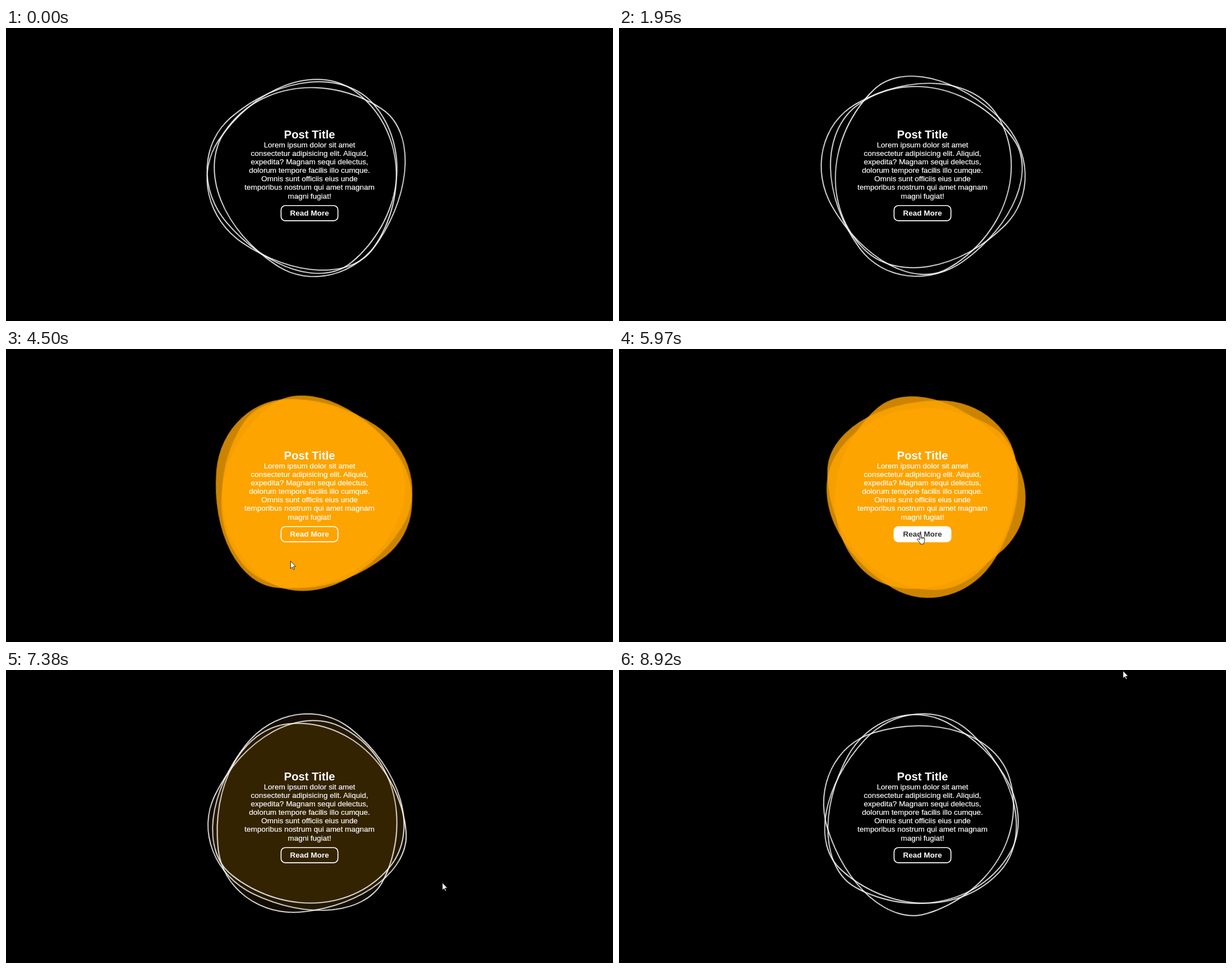
Write an HTML page that moves like this. It is 1076 px wide and 520 px high and loops after 8.96 s.

```html
<!DOCTYPE html>
<html lang="en">
<head>
<meta charset="utf-8">
<title>Blob card</title>
<style>
  * { margin: 0; padding: 0; box-sizing: border-box; }
  html, body { width: 100%; height: 100%; overflow: hidden; background: #000; }
  body { position: relative; }

  /* Laid out for a 1280px wide page, shown at 1076px */
  .page {
    position: absolute; left: 0; top: 0;
    width: 1280px; height: 618.6px;
    transform: scale(.840625); transform-origin: 0 0;
    font: 16px/18px "Liberation Sans", Arial, sans-serif;
    color: #fff; text-align: center; white-space: nowrap;
  }
  .blob {
    position: absolute; left: 440px; top: 109.3px;
    width: 400px; height: 400px;
    border: 2px solid #fff;
    border-radius: 38% 62% 63% 37% / 41% 44% 56% 59%;
  }
  .card { position: absolute; left: 0; top: 210.8px; width: 100%; }
  h2 { font-size: 24px; line-height: 27px; }
  p { -webkit-text-stroke: .25px; }
  .more {
    display: inline-block; margin-top: 10px; padding: 6px 18px;
    border: 2px solid #fff; border-radius: 10px;
    font-weight: bold;
  }
  .cursor { position: absolute; left: 0; top: 0; }
  .cursor svg { position: absolute; overflow: visible; fill: #fff; stroke: #000; }
  #hand { left: -5px; }
</style>
</head>
<body>
<div class="page">
  <div class="blob"></div>
  <div class="blob"></div>
  <div class="blob"></div>
  <div class="card">
    <h2>Post Title</h2>
    <p>Lorem ipsum dolor sit amet<br>
      consectetur adipisicing elit. Aliquid,<br>
      expedita? Magnam sequi delectus,<br>
      dolorum tempore facilis illo cumque.<br>
      Omnis sunt officiis eius unde<br>
      temporibus nostrum qui amet magnam<br>
      magni fugiat!</p>
    <div class="more">Read More</div>
  </div>
</div>
<div class="cursor">
  <svg id="arrow" width="10" height="16" viewBox="0 0 12 19">
    <path d="M.5 .5V16.5L4.3 13 6.8 18.5 9 17.5 6.5 12H11.5Z"/>
  </svg>
  <svg id="hand" width="14.3" height="18.5" viewBox="0 0 17 22">
    <path d="M5.5 13V2q0-1.5 1.5-1.5T8.5 2V8q0-1.2 1.4-1.2T11.3 8.3q0-1 1.3-1t1.3 1.4q0-.9 1.2-.9t1.3 1.4V14q0 2-1 3.5T14.5 21.5H7.5Q7 19 5 17L1 12.5Q.3 11 1.5 10.5T4 11.5Z"/>
    <path d="M8.5 8v3M11.3 8.3V11M13.9 8.7V11" fill="none"/>
  </svg>
</div>
<script>
const LOOP = 8960;
const AGE = 51.55;            // seconds the blobs have been turning at loop start
const IN = 3425, OUT = 7060;  // pointer enters and leaves the circle
const LAG = 50;               // the fill starts to fade in shortly after
const PRESS = [5000, 6840];   // pointer enters and leaves the button
const $ = s => document.querySelector(s);

// steps: [ms, properties, easing to the next step]
function track(el, steps) {
  const frames = steps.map(([ms, props, easing = 'linear']) =>
    ({ ...props, easing, offset: ms / LOOP }));
  const last = frames[frames.length - 1];
  if (last.offset < 1) frames.push({ ...last, offset: 1 });
  el.animate(frames, { duration: LOOP, iterations: Infinity });
}

// from a to b between on and off, with eased fades; hard changes if fade is 0
function hover(el, a, b, on, off, fade) {
  track(el, [
    [0, a], [on, a, 'ease'], [on + fade, b],
    [off, b, 'ease'], [off + fade, a]
  ]);
}

// signed seconds per turn
const turns = [6, 4, -10];
document.querySelectorAll('.blob').forEach((blob, i) => {
  const angle = s => ({ transform: `rotate(${(s * 360 / turns[i]).toFixed(2)}deg)` });
  track(blob, [[0, angle(AGE)], [LOOP, angle(AGE + LOOP / 1000)]]);
  hover(blob, { backgroundColor: 'rgba(255,165,0,0)' },
    { backgroundColor: 'rgba(255,165,0,.8)' }, IN + LAG, OUT, 500);
  hover(blob, { borderWidth: '2px' }, { borderWidth: '0px' }, IN, OUT, 0);
});

hover($('.more'), { backgroundColor: 'rgba(255,255,255,0)', color: '#fff' },
  { backgroundColor: '#fff', color: '#333' }, ...PRESS, 300);

const path = [
  [0, 516, 520], [3330, 516, 520], [3430, 511, 425], [3480, 511, 425],
  [3580, 505, 381], [3700, 504, 376], [4750, 504, 376], [5000, 519, 343],
  [5200, 533, 328], [6680, 533, 328], [6840, 590, 343], [7060, 712, 371],
  [7220, 773, 377], [8430, 773, 377], [8620, 870, 210], [8770, 909, 80],
  [8920, 893, 1]
];
track($('.cursor'), path.map(([ms, x, y]) =>
  [ms, { transform: `translate(${x}px,${y}px)` }]));

const shown = { opacity: 1 }, hidden = { opacity: 0 };
track($('.cursor'), [[0, hidden], [3330, hidden], [3330, shown]]);
hover($('#arrow'), shown, hidden, ...PRESS, 0);
hover($('#hand'), hidden, shown, ...PRESS, 0);
</script>
</body>
</html>
```
